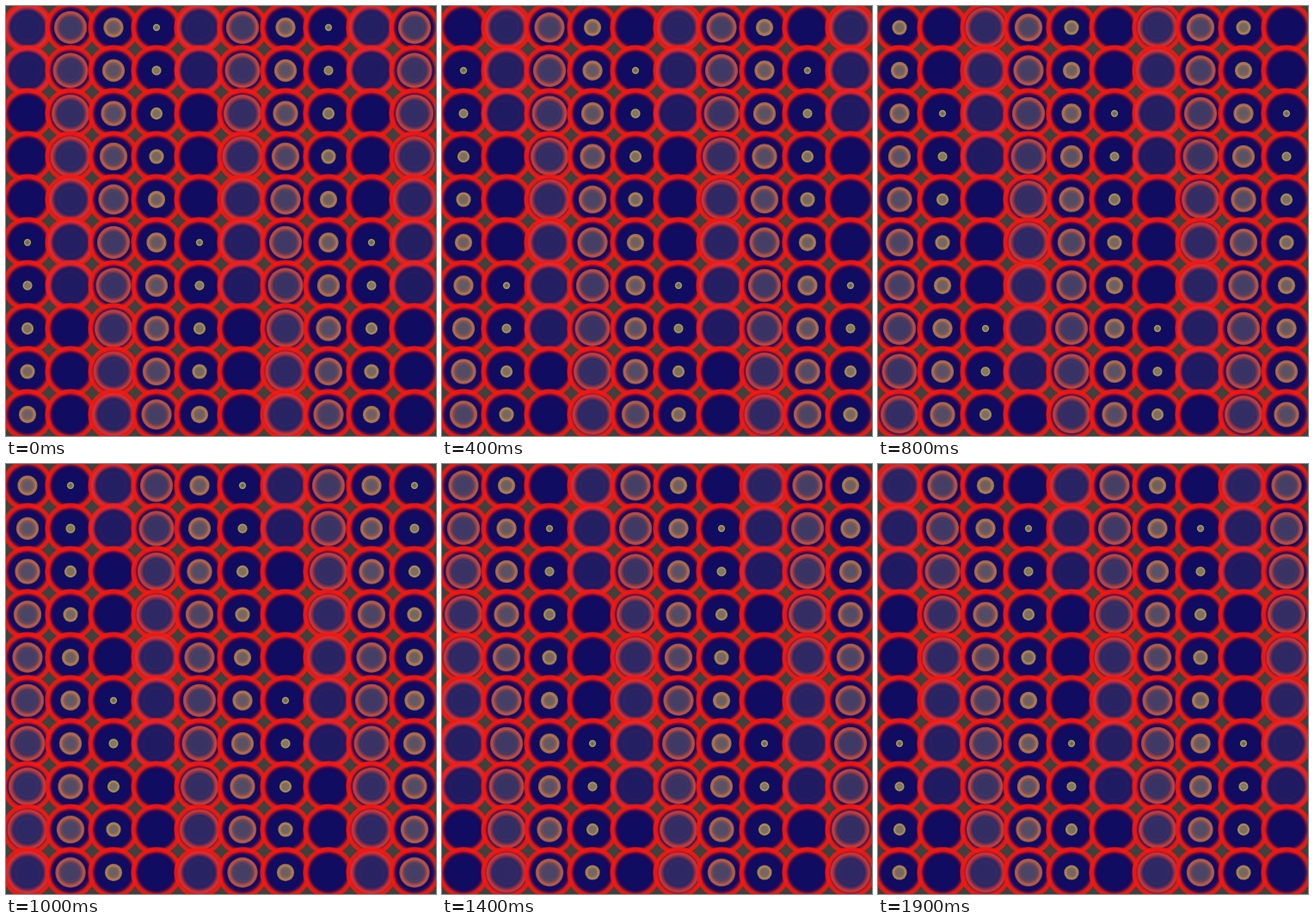
An HTML page with a canvas for the animation above (2000 ms loop, 500 by 500 pixels).

```html
<!DOCTYPE html>
<html lang="en">
<head>
<meta charset="utf-8">
<title>Pulsing discs</title>
<style>
  html, body { margin: 0; width: 100%; height: 100%; overflow: hidden; background: #40403c; }
  canvas { display: block; }
</style>
</head>
<body>
<canvas id="stage" width="500" height="500"></canvas>
<script>
const ctx = document.getElementById('stage').getContext('2d');
const STEPS = 20, STEP_MS = 100, CELL = 50;
const rgba = (r, g, b, a = 1) => `rgba(${r},${g},${b},${a})`;

function disc(x, y, radius, stops) {
  const gradient = ctx.createRadialGradient(x, y, 0, x, y, radius);
  for (const [r, color] of stops) gradient.addColorStop(r / radius, color);
  ctx.fillStyle = gradient;
  ctx.beginPath();
  ctx.arc(x, y, radius, 0, 2 * Math.PI);
  ctx.fill();
}

function ring(x, y, radius, color, width = 0.6) {
  ctx.strokeStyle = color;
  ctx.lineWidth = width;
  ctx.beginPath();
  ctx.arc(x, y, radius, 0, 2 * Math.PI);
  ctx.stroke();
}

// Navy disc with a soft red rim that reaches into its neighbours.
function drawBase(x, y) {
  disc(x, y, 30, [
    [0, rgba(15, 12, 97)],
    [17, rgba(15, 12, 97)],
    [20.5, rgba(24, 8, 92)],
    [22.5, rgba(60, 8, 80, 0.88)],
    [24, rgba(150, 14, 50, 0.7)],
    [25.2, rgba(240, 20, 18, 0.85)],
    [27, rgba(252, 22, 14, 0.9)],
    [29, rgba(245, 24, 16, 0.85)],
    [30, rgba(220, 28, 22, 0.3)]
  ]);
}

// The pulse widens, turns from yellow to red and fades as it ages.
function drawPulse(x, y, age) {
  if (age > 16) return;
  const r = 4.2 + 1.5 * age;
  const band = Math.min(r * 0.6, 6);
  const rim = alpha => rgba(195 + 2 * age, 185 - 9.2 * age, 88 - 2.6 * age, alpha);
  const core = rgba(160 - 3.5 * age, 150 - 3.5 * age, 105, 0.85 - 0.042 * age);

  disc(x, y, r, [
    [0, core],
    [r - band * 1.2, core],
    [r - band * 0.75, rim(0.6)],
    [r - band * 0.4, rim(0.85)],
    [r - band * 0.15, rim(0.75)],
    [r, rim(0.6)]
  ]);
  ring(x, y, r * 0.55, rim(0.15));
  if (age < 1) ring(x, y, 1.2, rgba(50, 45, 80, 0.7));
}

function draw(step) {
  ctx.fillStyle = '#40403c';
  ctx.fillRect(0, 0, 500, 500);
  for (let row = 0; row < 10; row++) {
    for (let col = 0; col < 10; col++) {
      const x = (col + 0.5) * CELL, y = (row + 0.5) * CELL;
      const age = (row + 5 * (15 - col) + step) % STEPS;
      drawBase(x, y);
      drawPulse(x, y, age);
    }
  }
}

const start = performance.now();
function tick() {
  draw(Math.floor((performance.now() - start) / STEP_MS) % STEPS);
  requestAnimationFrame(tick);
}
tick();
</script>
</body>
</html>
```
